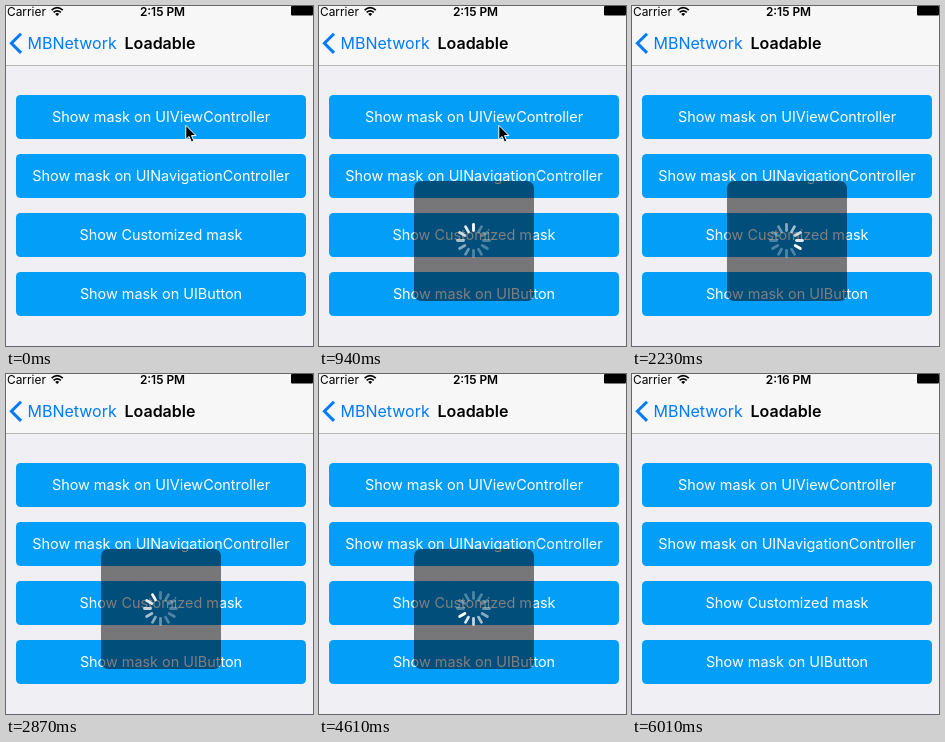
Write an HTML page that moves like this. It is 307 px wide and 340 px high and loops after 6.85 s.

```html
<!DOCTYPE html>
<html lang="en">
<head>
<meta charset="utf-8">
<title>Loadable</title>
<style>
  html, body { margin: 0; width: 100%; height: 100%; overflow: hidden; background: #efeff4; }
  svg { display: block; width: 100%; height: 100%; }
  text { font-family: Inter, Roboto, sans-serif; }
  .status { font-size: 11.9px; }
  .nav { font-size: 16px; }
  .bold { font-weight: 600; }
  .label { font-size: 14.4px; fill: #fff; text-anchor: middle; }
</style>
</head>
<body>
<svg viewBox="0 0 307 340">
  <rect width="307" height="340" fill="#efeff4"/>
  <rect width="307" height="59" fill="#f7f7f7"/>
  <rect y="59" width="307" height="1" fill="#b7b7ba"/>

  <text class="status" x="1" y="9.5">Carrier</text>
  <g fill="none" stroke="#000" stroke-width="1.7">
    <path d="M45.6 4.1Q51.2-.7 56.8 4.1"/>
    <path d="M47.6 6.4Q51.2 3.2 54.8 6.4"/>
  </g>
  <path d="M49.2 7.9Q51.2 6.2 53.2 7.9L51.2 10Z"/>
  <text class="status bold" id="clock" x="156.5" y="9.5" text-anchor="middle">2:15 PM</text>
  <rect x="285" width="22" height="9.5" rx="1"/>

  <path d="M15 27.7L5.4 37.3L15 46.9" fill="none" stroke="#007aff" stroke-width="3"/>
  <text class="nav" x="21.5" y="43" fill="#007aff">MBNetwork</text>
  <text class="nav bold" x="118.5" y="43">Loadable</text>

  <g id="buttons"></g>
  <g id="mask" opacity="0">
    <rect x="95" y="175" width="120" height="120" rx="7" fill-opacity=".5"/>
    <g id="spinner" transform="translate(154.5 234.5)" stroke="#fff" stroke-width="2.8" stroke-linecap="round"></g>
  </g>
  <path id="cursor" d="M0 0V14.2L3.3 11.2L5.6 16.6L8 15.6L5.7 10.3H10.2Z" stroke="#fff" stroke-width="1" stroke-linejoin="round"/>
</svg>
<script>
const LOOP = 6850;
const SPOKES = 12;
const TURN = 1000;
const $ = id => document.getElementById(id);

function add(parent, tag, attrs) {
  const el = document.createElementNS('http://www.w3.org/2000/svg', tag);
  for (const key in attrs) el.setAttribute(key, attrs[key]);
  return parent.appendChild(el);
}

const labels = [
  'Show mask on UIViewController',
  'Show mask on UINavigationController',
  'Show Customized mask',
  'Show mask on UIButton'
].map((title, i) => {
  const y = 89 + i * 59;
  add($('buttons'), 'rect', { x: 10, y, width: 290, height: 44, rx: 4.5, fill: '#039ef7' });
  const label = add($('buttons'), 'text', { class: 'label', x: 155, y: y + 27.4 });
  label.textContent = title;
  return label;
});

const spokes = Array.from({ length: SPOKES }, (_, i) =>
  add($('spinner'), 'line', { y1: -10, y2: -16, transform: `rotate(${i * 360 / SPOKES})` }));

// Smooth 0..1 progress between two times
function ramp(t, from, to) {
  const p = Math.min(1, Math.max(0, (t - from) / (to - from)));
  return p * p * (3 - 2 * p);
}

function draw(t) {
  // The pressed label dims, then recovers after release
  const press = t < 590 ? 0 : 1 - ramp(t, 680, 930);
  labels[0].setAttribute('opacity', 1 - 0.75 * press);

  $('mask').setAttribute('opacity', ramp(t, 660, 930) * (1 - ramp(t, 5600, 6010)));

  const lead = Math.floor((t - 886) * SPOKES / TURN);
  spokes.forEach((spoke, i) => {
    const age = (((lead - i) % SPOKES) + SPOKES) % SPOKES;
    spoke.setAttribute('opacity', Math.max(0.3, 1 - 0.12 * age));
  });

  const move = ramp(t, 1300, 1560);
  $('cursor').setAttribute('transform', `translate(${179.8 + 102 * move} ${119.3 - 6 * move})`);
  $('cursor').setAttribute('visibility', t < 1560 ? 'visible' : 'hidden');

  $('clock').textContent = t < 5200 ? '2:15 PM' : '2:16 PM';
}

const start = performance.now();
function tick() {
  draw((performance.now() - start) % LOOP);
  requestAnimationFrame(tick);
}
tick();
</script>
</body>
</html>
```
